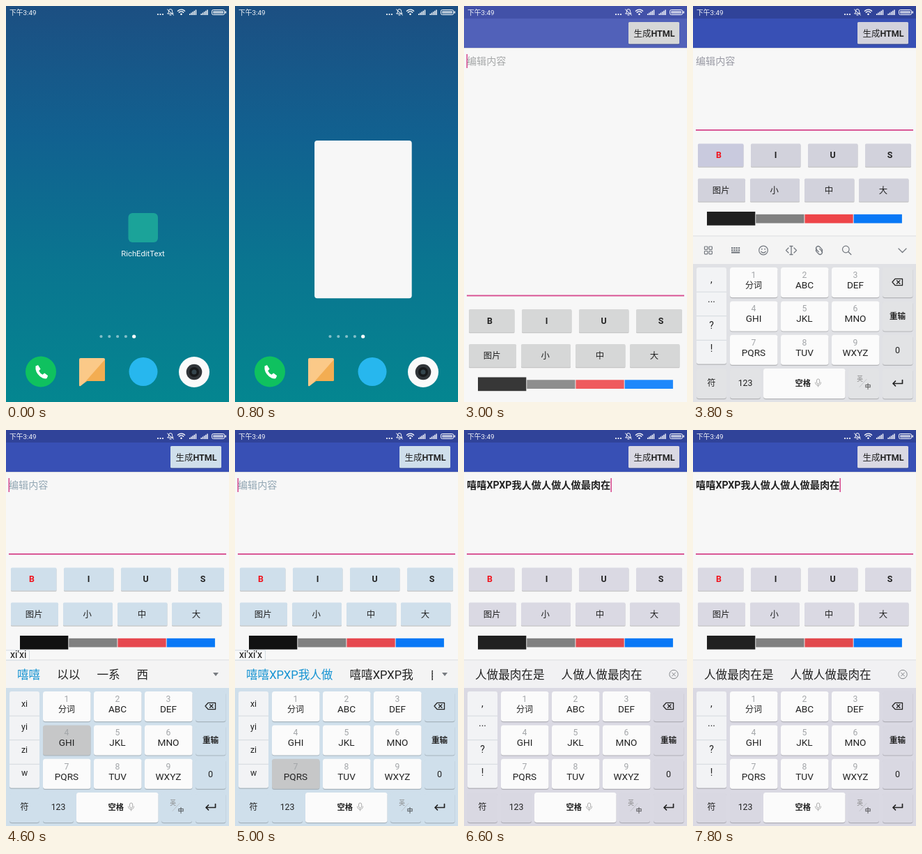
Write an HTML page that moves like this. It is 320 px wide and 568 px high and loops after 8000 ms.

```html
<!DOCTYPE html>
<html lang="zh-CN">
<head>
<meta charset="utf-8">
<title>Rich text editor demo</title>
<style>
html, body { margin: 0; width: 100%; height: 100%; overflow: hidden; background: #f7f7f7; }
svg { display: block; width: 320px; height: 568px; }
text { font-family: Roboto, "Noto Sans CJK SC", "Noto Sans CJK", sans-serif; white-space: pre; }
.line { fill: none; stroke-width: 1.3; stroke-linecap: round; stroke-linejoin: round; }
</style>
</head>
<body>
<svg id="stage" viewBox="0 0 320 568"></svg>
<script>
const STEP = 200, LOOP = 8000, LIFT = 237.5;
const PINK = '#d84f91';

const grey = { bar: '#3850b5', status: '#304399', btn: '#d2d2dc', hint: '#9a9ba5',
               kb: '#e0e1e5', side: '#e2e3e5', strip: '#f4f4f4',
               swatch: ['#202020', '#808080', '#ee4549', '#0878f6'] };
const themes = {
  grey,
  // The editor is still fading in over the blank window.
  faded: { ...grey, bar: '#5161b9', status: '#4251a8', btn: '#d6d7d7', hint: '#a6a8a9',
           swatch: ['#373737', '#8e8e8e', '#ef5a5d', '#1e88fb'] },
  blue:  { ...grey, btn: '#cfdfeb', hint: '#93a7b4', kb: '#cfdfeb', side: '#cfdfeb',
           swatch: ['#121212', '#808080', '#e6484f', '#0878f6'] },
  steel: { ...grey, btn: '#d0dce9', kb: '#d0dce9', side: '#d0dce9' },
  lilac: { ...grey, btn: '#dad9e3', kb: '#dad9e3', side: '#d9d8e2', strip: '#f1f1f3',
           swatch: ['#202020', '#808080', '#e2494d', '#0878f6'] }
};

const first = '嘻嘻XPXP我人做';
const next = '人做人做最肉在';

// Each cue overrides the scene state from its time onward.
const cues = [
  [0, { view: 'home' }],
  [600, { press: true }],
  [800, { open: .35 }],
  [1000, { open: .9 }],
  [1200, { view: 'blank' }],
  [3000, { view: 'editor', theme: 'faded', text: '', cursor: true }],
  [3200, { theme: 'grey' }],
  [3400, { typing: true, comp: '' }],
  [3600, { cursor: false, hold: true }],
  [3800, { bold: true }],
  [4000, { hold: false, cursor: true }],
  [4200, { theme: 'blue', comp: 'w', key: 9, side: ['w', 'x', 'y', 'z'], words: ['我', '在', '小', '有', '一'] }],
  [4400, { comp: 'xi', key: 4, side: ['xi', 'yi', 'zi', 'w'], words: ['系', '以', '洗', '西', '一'] }],
  [4600, { comp: "xi'xi", words: ['嘻嘻', '以以', '一系', '西'] }],
  [4800, { comp: "xi'xi'x", key: 9, words: [first, '嘻嘻XPXP我', '自'] }],
  [5000, { key: 7 }],
  [5600, { theme: 'steel', comp: '', side: null, words: null, text: first }],
  [6000, { words: ['人做最肉在是', next] }],
  [6200, { cursor: false }],
  [6600, { theme: 'lilac', key: 0, text: first + next, cursor: true }],
  [7000, { cursor: false }],
  [7400, { cursor: true }]
];

const rect = (x, y, w, h, fill, r = 0, more = '') =>
  `<rect x="${x}" y="${y}" width="${w}" height="${h}" rx="${r}" fill="${fill}" ${more}/>`;
const dot = (x, y, r, fill, more = '') => `<circle cx="${x}" cy="${y}" r="${r}" fill="${fill}" ${more}/>`;
const label = (x, y, s, size, fill = '#222', more = '') =>
  `<text x="${x}" y="${y}" font-size="${size}" fill="${fill}" ${more}>${s}</text>`;
const mid = (x, y, s, size, fill, more = '') => label(x, y, s, size, fill, 'text-anchor="middle" ' + more);
const line = (d, stroke, more = '') => `<path class="line" d="${d}" stroke="${stroke}" ${more}/>`;
const raised = (x, y, w, h, fill, r) =>
  rect(x, y + 1.2, w, h, '#000', r, 'opacity=".2"') + rect(x, y, w, h, fill, r);

function statusBar() {
  let out = label(5, 13, '下午3:49', 9.8, '#f4f6fa');
  for (const x of [218, 221.5, 225]) out += dot(x, 12, 1.1, '#fff');
  out += line('M232 11h8l-1.400-2.200v-1.600a2.600 2.600 0 0 0-5.200 0v1.600zM235 13h2M231.500 5l9 8', '#fff', 'style="stroke-width:1"');
  out += line('M246.5 7.2a7 7 0 0 1 10 0M248.3 9.3a4.6 4.6 0 0 1 6.4 0', '#fff') + dot(251.5, 11.7, 1.3, '#fff');
  for (const x of [263, 279.5])
    for (let i = 0; i < 5; i++) out += rect(x + i * 2.2, 11 - i * 1.4, 1.4, 2 + i * 1.4, '#fff');
  out += rect(295.5, 5.5, 18, 7, 'none', 2, 'stroke="#fff"') + rect(297, 7, 15, 4, '#fff', 1, 'opacity=".65"');
  return out + rect(314.5, 7.5, 1.5, 3, '#fff');
}

function home(s) {
  let out = `<defs><linearGradient id="sky" x2="0" y2="1">
    <stop stop-color="#1c4f82"/><stop offset=".33" stop-color="#116190"/>
    <stop offset=".65" stop-color="#0a7590"/><stop offset="1" stop-color="#048690"/></linearGradient></defs>`;
  out += rect(0, 0, 320, 568, 'url(#sky)') + statusBar();
  out += rect(175.5, 297, 42.5, 42, '#1ba399', 6);
  if (s.press) out += rect(175.5, 297, 42.5, 42, '#000', 6, 'opacity=".35"');
  out += mid(196.5, 358.5, 'RichEditText', 11.3, '#f3f8fa');
  for (let i = 0; i < 5; i++)
    out += dot(136.5 + i * 11.8, 474, i < 4 ? 2.1 : 2.6, '#fff', i < 4 ? 'opacity=".5"' : '');
  out += dot(50, 524.5, 22, '#0fc15f');
  out += '<path d="M42.5 516.5l3.5-1.5 3.6 5.8-2.4 2.4q1.8 4 5.4 5.6l2.6-2.2 5 3.6-1.6 3.8q-3.8 2-9.6-2.4-7.6-6.600-6.500-15.100z" fill="#fff"/>';
  out += '<path d="M107 505h33q2 0 2 2v29q0 2-2 2h-24l-9 7q-2 1-2-1v-37q0-2 2-2z" fill="#fbc988"/>';
  out += '<path d="M142 507v29q0 2-2 2h-24l-4 3z" fill="#f3ad52"/>';
  out += dot(197, 524.5, 20.5, '#27b7ee');
  out += dot(270, 525, 22, '#fafafa') + dot(270, 525, 11.3, '#303438') +
    dot(270, 525, 7, '#17191b') + dot(270, 525, 3.5, '#35454d');
  if (s.open) {
    const p = s.open, q = 1 - p;
    out += rect(175.5 * q, 297 * q, 42.5 + 277.5 * p, 42 + 526 * p, '#f7f7f7', 6 * q);
  }
  return out;
}

function panel(s, c) {
  let out = rect(4, 414.5, 312, 1.9, PINK);
  [[7, 65.5, 'B', 37], [83, 71.5, 'I', 118.5], [165, 71.5, 'U', 200.5], [247, 66, 'S', 282.5]].forEach(([x, w, t, cx], i) => {
    out += raised(x, 435, w, 33, !i && s.hold ? '#c9cade' : c.btn, 1.5);
    out += mid(cx, 455.7, t, 12.4, !i && s.bold ? '#f0141e' : '#222', 'font-weight="700"');
  });
  [[7, 68, '图片'], [82, 71, '小'], [160, 71.5, '中'], [238, 71.5, '大']].forEach(([x, w, t]) => {
    out += raised(x, 485, w, 33, c.btn, 1.5) + mid(x + w / 2 - .8, 506, t, 12.4);
  });
  c.swatch.forEach((fill, i) => {
    out += rect(20 + i * 70.2, i ? 536.3 : 532.5, 69.3, i ? 12.7 : 19.7, fill);
  });
  return out;
}

function toolbar() {
  const g = '#747980', thin = `stroke="${g}" stroke-width="1.2"`;
  let out = '';
  for (const x of [16.5, 23]) for (const y of [345, 351.5]) out += rect(x, y, 4.4, 4.4, 'none', .8, thin);
  for (let r = 0; r < 2; r++) for (let i = 0; i < 4; i++) out += rect(55 + i * 3.3, 346 + r * 3.2, 2.3, 2.2, g);
  out += rect(55, 352.4, 12.2, 2.2, g);
  out += dot(101, 350.5, 6.3, 'none', thin) + dot(98.8, 348.7, .9, g) + dot(103.2, 348.7, .9, g);
  out += line('M97.8 352.2q3.2 3.6 6.4 0', g);
  out += line('M137 347l-3.5 3.5 3.5 3.5M145 347l3.5 3.5-3.5 3.5M141 344.5v12M139 344.5h4M139 356.5h4', g);
  // Two open loops make the chain.
  out += line('M182 352.500h-4a3 3 0 0 1 0-6h4a3 3 0 0 1 3 3M180 348.500h4a3 3 0 0 1 0 6h-4a3 3 0 0 1-3-3', g, 'transform="rotate(45 181 350.5)"');
  out += dot(219.3, 349, 4.8, 'none', thin) + line('M223 352.7l3.8 3.8', g);
  return out + line('M295 348l5.5 5.5 5.5-5.5', g);
}

function candidates(s) {
  const tint = s.comp ? '#1593d2' : '#222';
  const spans = s.words.map((w, i) => `<tspan ${i ? 'dx="24"' : `fill="${tint}"`}>${w}</tspan>`).join('');
  const out = '<clipPath id="words"><path d="M0 330h284v40H0z"/></clipPath>' +
    `<g clip-path="url(#words)">${label(16, 356.5, spans, 16.6)}</g>`;
  return out + (s.comp ? '<path d="M297 348h8l-4 5z" fill="#777b80"/>'
    : dot(301, 350.5, 6.2, 'none', 'stroke="#85888c"') + line('M298.5 348l5 5M303.5 348l-5 5', '#85888c', 'style="stroke-width:1"'));
}

function keyboard(s, c) {
  let out = rect(0, 330, 320, 40, c.strip) + rect(0, 370, 320, 198, c.kb);
  out += rect(0, 329.5, 320, .8, '#d5d7da');
  out += s.words ? candidates(s) : toolbar();
  if (s.comp) {
    const w = 10 + s.comp.length * 4.9;
    out += rect(-1, 316, w, 14, '#f8f9fa', 0, 'stroke="#c4cfd6" stroke-width=".7"') + label(6, 327, s.comp, 14.2, '#111');
  }
  out += raised(5, 375, 43, 138.5, '#f2f3f5', 3);
  (s.side || [',', '···', '?', '!']).forEach((t, i) => {
    if (i) out += rect(5, 375 + i * 34.6, 43, 1, '#d4d9de');
    out += mid(26.5, 397 + i * 33, t, s.side ? 12.3 : 14);
  });
  ['分词', 'ABC', 'DEF', 'GHI', 'JKL', 'MNO', 'PQRS', 'TUV', 'WXYZ'].forEach((t, i) => {
    const x = 53 + i % 3 * 73, y = 375 + Math.floor(i / 3) * 48.4;
    out += raised(x, y, 68.5, 43, s.key === i + 1 ? '#c6c7c8' : '#fbfbfb', 3.5);
    out += mid(x + 34, y + 14.7, i + 1, 12.2, '#a2a5a8') + mid(x + 34, y + 29.8, t, i ? 13.6 : 12);
  });
  for (let r = 0; r < 4; r++) out += raised(272, 375 + r * 48.4, 43.5, 43, c.side, 3.5);
  out += line('M286 396l4-4.7h10.5v9.4H290zM292.5 393.8l4.4 4.4M296.9 393.8l-4.4 4.4', '#222');
  out += mid(293.5, 448.7, '重输', 11.6, '#222', 'font-weight="700"') + mid(293.5, 497.5, '0', 12.5);
  out += line('M300.5 536.5v5h-13.5M290.5 538l-3.5 3.5 3.5 3.5', '#222', 'style="stroke-width:1.7"');
  out += raised(5, 520, 43, 43, c.side, 3.5) + mid(26.5, 545, '符', 12);
  out += raised(53, 520, 44, 43, c.side, 3.5) + mid(75, 545.3, '123', 12.3);
  out += raised(101, 520, 117.5, 43, '#fbfbfb', 3.5) + label(146.5, 545, '空格', 11.3, '#222', 'font-weight="700"');
  out += rect(177.5, 535, 4.2, 7, 'none', 2.1, 'stroke="#aaa"') + line('M175.5 540q0 4 4 4t4-4M179.5 544v2', '#aaa', 'style="stroke-width:1"');
  out += raised(223, 520, 44, 43, c.side, 3.5) + mid(239.5, 537.5, '英', 8.6, '#888') + mid(251, 549, '中', 8.6);
  return out + line('M249 535.5l-10 11', '#b5b8bc', 'style="stroke-width:.7"');
}

function editor(s) {
  const c = themes[s.theme];
  const wide = s.text.replace(/\w/g, '').length;
  const end = s.text ? 4.3 + wide * 14.2 + 36.5 : 4.3;
  let out = rect(0, 0, 320, 568, '#f7f7f7') + rect(0, 0, 320, 60, c.bar) + rect(0, 0, 320, 18, c.status);
  out += rect(0, 60, 320, 1, '#000', 0, 'opacity=".1"') + statusBar();
  out += raised(236, 23, 73, 31.5, c.btn, 1.5);
  out += mid(273, 43.5, '生成<tspan font-weight="700">HTML</tspan>', 12.5, '#222', 'font-weight="500"');
  out += s.text ? label(4, 84.3, s.text, 14.2, '#222', 'font-weight="700"') : label(4, 84.3, '编辑内容', 14.1, c.hint);
  if (s.cursor) out += rect(end - .8, 69, 1.6, 20, PINK);
  out += `<g transform="translate(0 ${s.typing ? -LIFT : 0})">${panel(s, c)}</g>`;
  return out + (s.typing ? keyboard(s, c) : '');
}

const views = { home, editor, blank: () => rect(0, 0, 320, 568, '#f7f7f7') };
const stage = document.getElementById('stage');
const start = performance.now();
let shown = -1;

function draw() {
  const step = Math.floor((performance.now() - start) % LOOP / STEP);
  if (step !== shown) {
    const state = Object.assign({}, ...cues.filter(([t]) => t <= step * STEP).map(cue => cue[1]));
    stage.innerHTML = views[state.view](state);
    shown = step;
  }
  requestAnimationFrame(draw);
}
draw();
</script>
</body>
</html>
```
